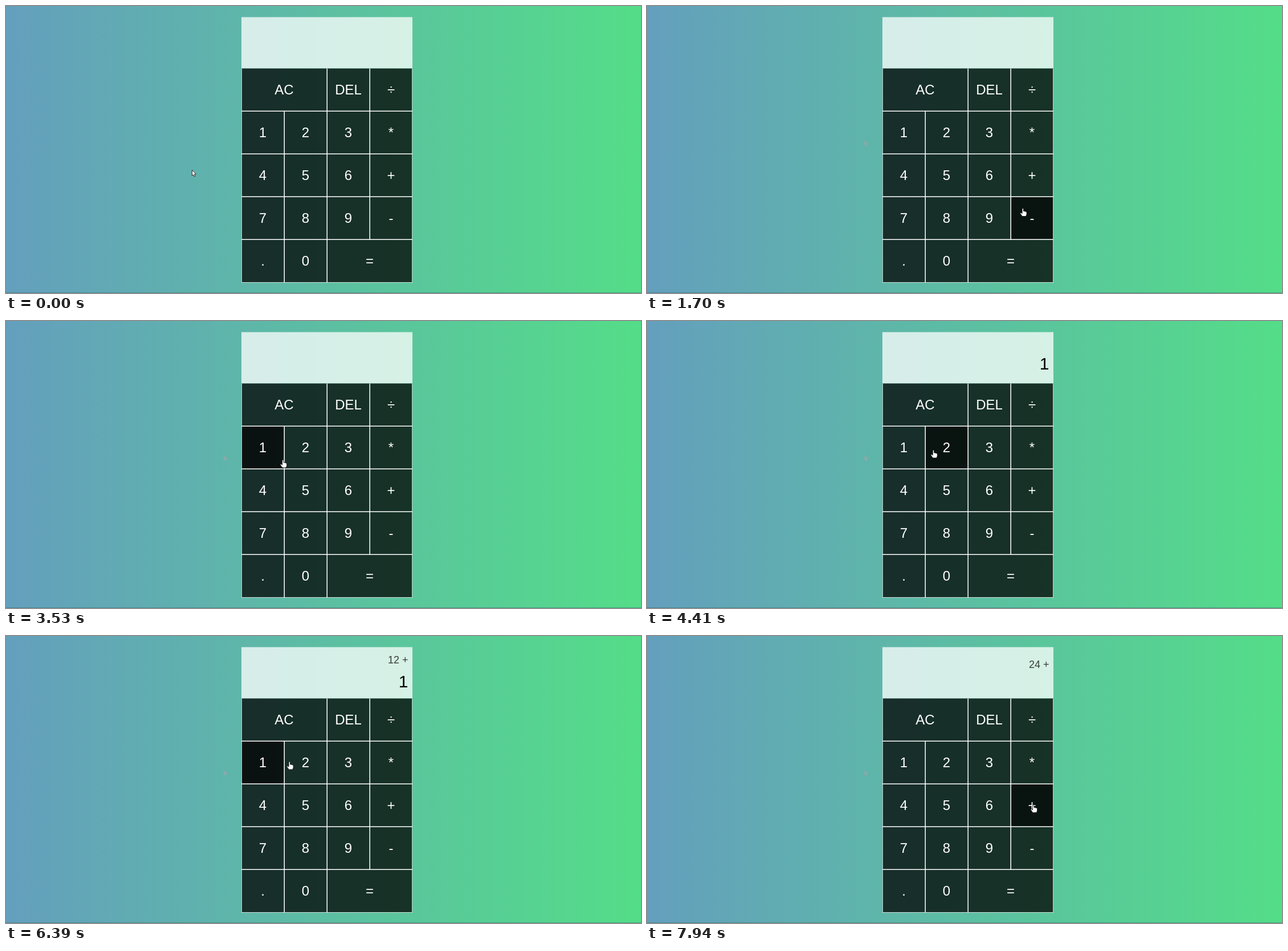
Write an HTML page that moves like this. It is 1114 by 503 pixels and loops after 8000 ms.

```html
<!DOCTYPE html>
<html lang="en">
<head>
<meta charset="utf-8">
<title>Calculator</title>
<style>
  html, body { margin: 0; width: 100%; height: 100%; overflow: hidden; }
  body { background: linear-gradient(to right, #649fbd, #54dd88); }
  svg { position: absolute; left: 0; top: 0; display: block; }
  text { font-family: "Liberation Sans", Arial, sans-serif; }
  #labels text { font-size: 24px; fill: #fff; text-anchor: middle; }
  #prev, #curr { text-anchor: end; white-space: pre; }
  #prev { font-size: 18px; fill: rgba(0, 0, 0, .75); }
  #curr { font-size: 30px; fill: #000; }
</style>
</head>
<body>
<svg width="1114" height="503" viewBox="0 0 1114 503">
  <defs>
    <path id="arrowShape" d="M.5 .5V10.6L2.8 8.5L4.4 12L6 11.3L4.5 7.8H7.4Z"/>
  </defs>
  <rect y="502" width="1114" height="1" fill="#2f6f6f" opacity=".55"/>
  <rect x="413" y="19.5" width="300" height="90" fill="#fff" opacity=".75"/>
  <rect x="413" y="109.5" width="300" height="375" opacity=".75"/>
  <rect id="hover" opacity=".6"/>
  <g id="lines" fill="#fff"></g>
  <g id="labels"></g>
  <text id="prev" x="705.5"></text>
  <text id="curr" x="705.5"></text>
  <use id="ghost" href="#arrowShape" x="381" y="234" fill="#9aa5aa" opacity=".8"/>
  <use id="arrow" href="#arrowShape" fill="#fff" stroke="#222" stroke-width=".9"/>
  <path id="hand" fill="#fff" stroke="#111" stroke-width=".8" stroke-linejoin="round"
    d="M-1.4 1Q-.2 -.6 1 1V5L3 5.2L5 5.8L6.6 6.8V10.5L5.4 14H-1.2L-4.6 9.2Q-5 7.6 -3.4 7.8L-1.4 9.2Z"/>
  <circle id="ring" r="9" fill="#bcb600" opacity=".7"/>
</svg>
<script>
const LOOP = 8000, STEP = 70, LAG = 30;
const LEFT = 413, TOP = 109.5, CELL = 75;
const NS = "http://www.w3.org/2000/svg";
const $ = id => document.getElementById(id);

function add(parent, tag, attrs, text) {
  const el = document.createElementNS(NS, tag);
  set(el, attrs);
  if (text) el.textContent = text;
  $(parent).append(el);
}
function set(el, attrs) {
  for (const k in attrs) el.setAttribute(k, attrs[k]);
}
const show = (el, on) => { el.style.display = on ? "" : "none"; };

// Each row lists its keys; a number after a key is its width in cells.
const keys = [];
[["AC", 2, "DEL", 1, "÷", 1],
 ["1", 1, "2", 1, "3", 1, "*", 1],
 ["4", 1, "5", 1, "6", 1, "+", 1],
 ["7", 1, "8", 1, "9", 1, "-", 1],
 [".", 1, "0", 1, "=", 2]].forEach((row, r) => {
  let x = LEFT;
  for (let i = 0; i < row.length; i += 2) {
    const w = row[i + 1] * CELL;
    keys.push({ label: row[i], x, y: TOP + r * CELL, w });
    x += w;
  }
});

for (const k of keys) {
  add("labels", "text", { x: k.x + k.w / 2, y: k.y + 45.5 }, k.label);
  if (k.x > LEFT) add("lines", "rect", { x: k.x - .5, y: k.y, width: 1.5, height: CELL });
}
for (let r = 1; r < 5; r++)
  add("lines", "rect", { x: LEFT, y: TOP + r * CELL - 1, width: 300, height: 1.5 });
add("lines", "rect", { x: LEFT, y: TOP, width: .75, height: 375 });
add("lines", "rect", { x: 712.25, y: TOP, width: .75, height: 375 });
add("lines", "rect", { x: LEFT, y: 484, width: 300, height: .75 });

// Pointer path: time, x, y
const path = [
  [0, 326, 287], [440, 326, 287], [650, 381, 233], [860, 428, 212],
  [1280, 612, 210], [1420, 660, 225], [1700, 659.5, 354.5], [1910, 645, 430],
  [2120, 576, 436], [2190, 540, 413], [2330, 505, 385], [2470, 455, 368],
  [2680, 445, 312], [2960, 528, 300], [3240, 478, 288], [3460, 483, 251],
  [3530, 486, 243], [3740, 452, 226], [4020, 452, 226], [4490, 523, 226],
  [4950, 523, 226], [5440, 671, 303.5], [5770, 671, 303.5], [6110, 452, 222],
  [6310, 452, 222], [6390, 497.5, 220], [6520, 523, 226], [6590, 523, 226],
  [7150, 679, 296.5], [7870, 679, 296.5], [7940, 678, 295.5], [8000, 678, 295.5]
];

function segment(t) {
  let i = 0;
  while (i < path.length - 2 && t >= path[i + 1][0]) i++;
  return [path[i], path[i + 1]];
}
function point(t) {
  const [a, b] = segment(t);
  const u = (t - a[0]) / (b[0] - a[0]);
  return [a[1] + (b[1] - a[1]) * u, a[2] + (b[2] - a[2]) * u];
}
// The pointer advances in even ticks inside each segment.
function tick(t) {
  const [a, b] = segment(t);
  const span = b[0] - a[0], n = Math.max(1, Math.round(span / STEP));
  return a[0] + Math.floor((t - a[0]) / span * n + 1e-6) * span / n;
}

// Clicks: start, end
const clicks = [[3870, 4000], [4560, 4690], [5440, 5580], [6180, 6310], [6590, 6720], [7550, 7680]];

// Display: time, previous line, current line
const display = [
  [0, "", ""], [4000, "", "1"], [4690, "", "12"], [5580, "12 +", ""],
  [6310, "12 +", "1"], [6720, "12 +", "12"], [7680, "24 +", ""]
];

const keyAt = ([x, y]) => keys.find(k =>
  x >= k.x && x < k.x + k.w && y >= k.y && y < k.y + CELL);

function draw(t) {
  const q = tick(t), [x, y] = point(q);
  const key = keyAt(point(Math.max(0, q - LAG)));
  const hover = $("hover");
  show(hover, key);
  if (key) set(hover, { x: key.x + .75, y: key.y + .5, width: key.w - 1.25, height: CELL - 1.5 });

  const over = !!keyAt([x, y]);
  show($("hand"), over);
  show($("arrow"), !over);
  set(over ? $("hand") : $("arrow"), { transform: `translate(${x} ${y})` });
  show($("ghost"), t >= 650);

  const press = clicks.some(([from, to]) => t >= from && t < to);
  show($("ring"), press);
  if (press) set($("ring"), { cx: x, cy: y });

  const [, prev, curr] = display.filter(d => t >= d[0]).pop();
  $("prev").textContent = prev;
  $("curr").textContent = curr;
  set($("prev"), { y: curr ? 48 : 56 });
  set($("curr"), { y: prev ? 89.5 : 85 });
}

const start = performance.now();
function frame(now) {
  draw(Math.max(0, now - start) % LOOP);
  requestAnimationFrame(frame);
}
draw(0);
requestAnimationFrame(frame);
</script>
</body>
</html>
```
